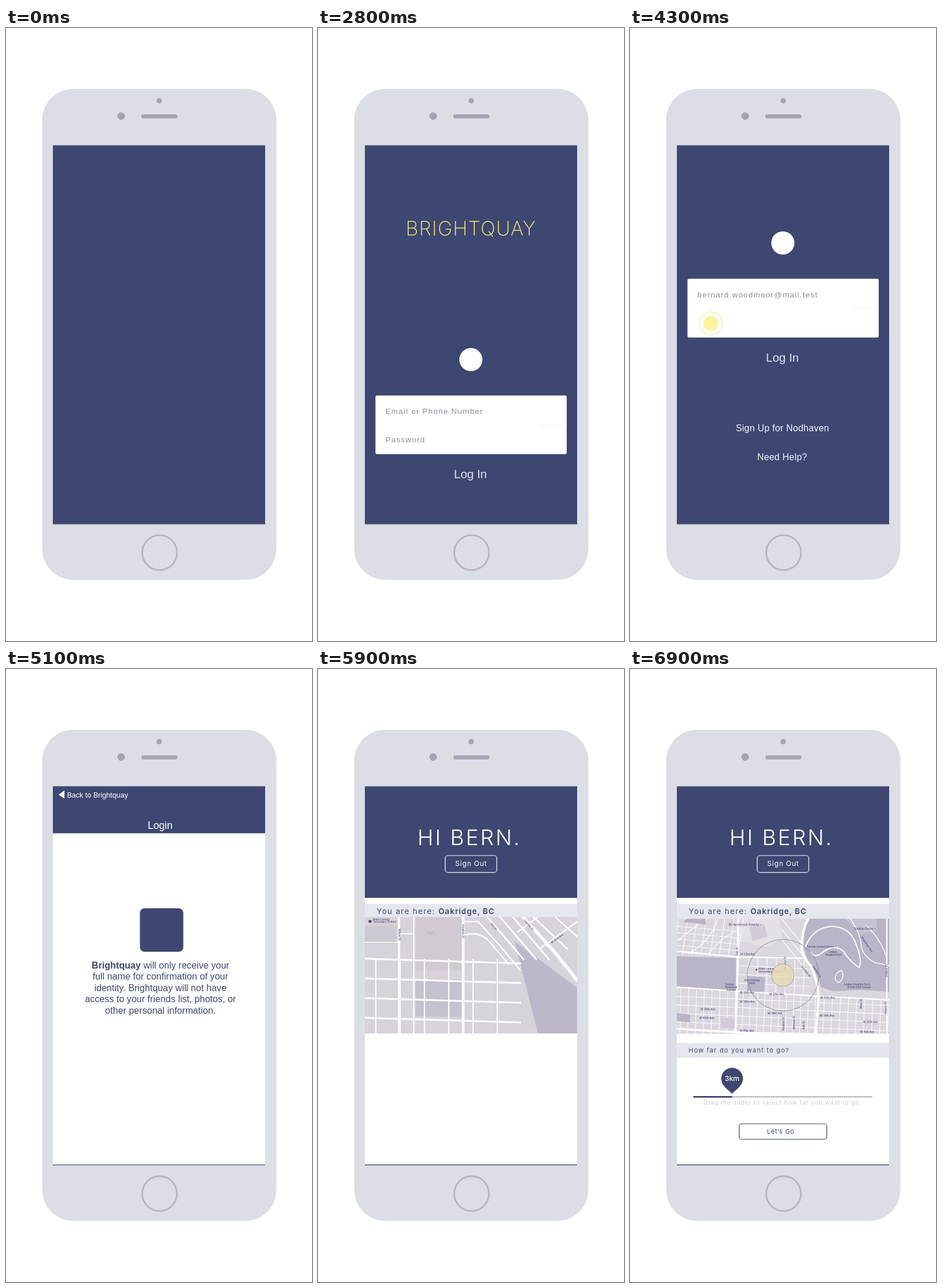
Write an HTML page that moves like this. It is 529 by 1058 pixels and loops after 7000 ms.

```html
<!DOCTYPE html>
<html lang="en">
<head>
<meta charset="utf-8">
<title>Sign-in flow</title>
<style>
  html, body { margin: 0; width: 100%; height: 100%; overflow: hidden; background: #fff; }
  svg { display: block; width: 100vw; height: 100vh; }
  text { white-space: pre; }
  .ui { font-family: Inter, sans-serif; }
  .sys { font-family: "Liberation Sans", sans-serif; }
  .mid { text-anchor: middle; }
  .btn { fill: none; stroke: #fff; stroke-width: 1.2; }
  .road { fill: none; stroke: #fff; stroke-linecap: butt; stroke-linejoin: round; }
  .tag { font: 500 4.6px Inter, sans-serif; fill: #3e4771; }
</style>
</head>
<body>
<svg viewBox="0 0 529 1058" xmlns="http://www.w3.org/2000/svg">
  <defs>
    <clipPath id="screenClip"><rect x="81" y="202.5" width="367" height="653.5"/></clipPath>
    <clipPath id="nearClip"><rect x="81" y="428" width="367" height="201"/></clipPath>
    <clipPath id="farClip"><rect x="81" y="431" width="367" height="198.5"/></clipPath>
  </defs>
  <rect width="529" height="1058" fill="#fff"/>
  <rect x="62.5" y="105" width="405" height="847.5" rx="54" fill="#dcdee6"/>
  <g fill="#a6a4b4">
    <circle cx="265" cy="125.5" r="4.6"/>
    <circle cx="199" cy="152" r="6.5"/>
    <rect x="234" y="149" width="62.5" height="7" rx="3.5"/>
  </g>
  <circle cx="265.5" cy="905.5" r="30" fill="none" stroke="#b9b5c5" stroke-width="3"/>
  <rect x="81" y="202.5" width="367" height="654" fill="#3e4771"/>

  <g clip-path="url(#screenClip)">
    <text id="brand" class="ui mid" x="264.5" font-size="34" font-weight="200" letter-spacing="1.2" fill="#f7ec78">BRIGHTQUAY</text>

    <g id="welcome" class="ui" fill="#fff">
      <g font-size="10" font-weight="500" letter-spacing=".86">
        <text x="148" y="419">Welcome.</text>
        <text x="148" y="433.7">Please introduce yourself to get started.</text>
        <text x="152.5" y="670">Or do you need immediate assistance?</text>
      </g>
      <path d="M148 452.4H380" stroke="#777b8c"/>
      <rect class="btn" x="152.7" y="489.3" width="224" height="29.4" rx="4"/>
      <rect class="btn" x="152.7" y="540.7" width="224" height="29.4" rx="4"/>
      <rect class="btn" x="152.7" y="686.6" width="224" height="29.2" rx="4"/>
      <path class="btn" d="M184.5 489.3v29.4M184.5 540.7v29.4"/>
      <circle cx="168.5" cy="504" r="6.5"/>
      <circle cx="168.5" cy="555" r="6.5"/>
      <g font-size="12" font-weight="300" letter-spacing=".85">
        <text x="210.5" y="508">Sign in with Nodhaven</text>
        <text x="210.5" y="559.4">Sign in with Velmor Plus</text>
        <text x="204" y="705.3" font-size="11.5" font-weight="400" letter-spacing=".8">Let us book for you</text>
      </g>
    </g>

    <g id="social" class="sys">
      <circle cx="264.3" cy="371" r="20" fill="#fff"/>
      <rect x="99.3" y="432.8" width="330.7" height="101.4" rx="3" fill="#fff"/>
      <path d="M384 484h46" stroke="#f1f1f4"/>
      <g font-size="13.5" letter-spacing="1.2" fill="#8f8d9a">
        <text id="mail" x="116.5" y="465"></text>
        <text id="pass" x="116.5" y="513.5">Password</text>
      </g>
      <g class="mid">
        <text x="263.5" y="575.6" font-size="20.5" fill="#e4e4ec">Log In</text>
        <g font-size="15.8" letter-spacing=".3" fill="#f6f6fa">
          <text x="263.7" y="696">Sign Up for Nodhaven</text>
          <text x="263.2" y="746.3">Need Help?</text>
        </g>
      </g>
    </g>

    <g id="tap">
      <circle id="dot" fill="#faf39e"/>
      <circle id="halo" fill="none" stroke="#f3ea94" stroke-width="1.2"/>
    </g>

    <g id="home" class="ui">
      <rect x="81" y="395" width="367" height="460.3" fill="#fff"/>
      <text x="172" y="304" font-size="37" font-weight="300" letter-spacing="3" fill="#fff">HI BERN.</text>
      <rect class="btn" x="220" y="322" width="89" height="29.2" rx="4.5"/>
      <text class="mid" x="264.8" y="340.3" font-size="12" letter-spacing=".8" fill="#fff">Sign Out</text>
      <rect x="81" y="405.5" width="367" height="25.7" fill="#e5e7ee"/>
      <g font-size="13.4" fill="#3e4771">
        <text x="101.3" y="423" letter-spacing="1.35">You are here:</text>
        <text x="208.3" y="423" font-weight="600" letter-spacing="1">Oakridge, BC</text>
      </g>
      <g id="farMap"></g>
      <g id="nearMap"></g>
      <g id="controls">
        <circle cx="264.3" cy="528.5" r="19.5" fill="#e6dcb4" fill-opacity=".82" stroke="#8f8c9c" stroke-width=".8"/>
        <circle id="range" cx="264.7" cy="528.5" fill="none" stroke="#868496" stroke-width=".9"/>
        <rect x="81" y="645.5" width="367" height="25.5" fill="#e5e7ee"/>
        <text x="101.3" y="662.3" font-size="11" letter-spacing="1.2" fill="#3e4771">How far do you want to go?</text>
        <path d="M109.5 738.4H419" stroke="#b9b5c8" stroke-width="2.4"/>
        <path id="done" stroke="#3e4771" stroke-width="2.6"/>
        <text x="126.7" y="752" font-size="10" font-weight="300" letter-spacing="1.05" fill="#bfbec8">Drag the slider to select how far you want to go.</text>
        <circle id="grip" cx="148.8" cy="706.5" r="20" fill="none" stroke="#d8d8cf" stroke-width=".8"/>
        <g id="pin">
          <path d="M0 26C-6 20 -18.8 12 -18.8 0A18.8 18.8 0 1 1 18.8 0C18.8 12 6 20 0 26Z" fill="#3e4771"/>
          <text id="km" class="mid" y="4.2" font-size="12.3" font-weight="500"></text>
        </g>
        <rect x="188.7" y="785" width="151.6" height="26.5" rx="4" fill="#fff" stroke="#3e4771" stroke-width="1.2"/>
        <text class="mid" x="260.6" y="801.6" font-size="11" letter-spacing=".7" fill="#3e4771">Let’s Go</text>
      </g>
    </g>

    <g id="consent" class="sys">
      <rect width="367" height="81" x="81" fill="#3e4771"/>
      <rect x="81" y="81" width="367" height="700" fill="#fff"/>
      <path d="M91 14.3L101 7.3V21.3Z" fill="#fff"/>
      <text x="105.4" y="19" font-size="12.6" fill="#fff">Back to Brightquay</text>
      <text class="mid" x="266.5" y="73.6" font-size="17.6" fill="#fff">Login</text>
      <rect x="231.5" y="210.5" width="75" height="75" rx="8" fill="#3e4771"/>
      <g id="terms" class="mid" font-size="16.1" fill="#3e4771"></g>
    </g>
    <path id="edge" d="M81 855.8H448" stroke="#3e4771" stroke-width="1"/>
  </g>
</svg>
<script>
const $ = id => document.getElementById(id);
const clamp = v => Math.max(0, Math.min(1, v));
const attr = (id, o) => { for (const k in o) $(id).setAttribute(k, o[k]); };
const fade = (id, v) => attr(id, { opacity: clamp(v), display: v > 0 ? 'inline' : 'none' });

const road = (d, w, extra = '') => `<path class="road" d="${d}" stroke-width="${w}" ${extra}/>`;
const area = (d, c) => `<path d="${d}" fill="${c}"/>`;
const tag = (x, y, s, turn = 0) =>
  `<text class="tag" transform="translate(${x} ${y}) rotate(${turn})">${s}</text>`;

// Parallel streets: n copies of one segment, shifted by (sx, sy).
function streets(x, y, dx, dy, sx, sy, n, w) {
  let d = '';
  for (let i = 0; i < n; i++) d += `M${x + sx * i} ${y + sy * i}l${dx} ${dy}`;
  return road(d, w);
}

function drawFarMap() {
  const park = '#b9b5c8', land = '#dcd6de', pale = '#e5dfe6';
  $('farMap').innerHTML = '<g clip-path="url(#farClip)">' + [
    `<rect x="81" y="431" width="367" height="199" fill="${land}"/>`,
    area('M190 431H258L264 466 236 480 190 470Z', pale),
    area('M206 446l26 -6 6 22 -26 8Z', '#d2ccd8'),
    streets(84, 431, -10, 64, 16, 0, 8, 1),
    streets(81, 444, 106, 9, 0, 11, 5, 1),
    road('M81 470Q110 445 134 431M100 492Q140 470 152 431M134 494Q160 460 186 452', 1.2),
    streets(205, 498, -1, 60, 16, .6, 7, 1),
    streets(188, 512, 122, 6, 0, 15, 3, 1),
    streets(88, 551, -2, 80, 13.5, .6, 8, 1),
    streets(196, 559, -3, 72, 12.5, .6, 11, 1),
    streets(336, 566, -3, 66, 14, .4, 9, 1),
    streets(81, 565, 367, 16, 0, 14.6, 4, 1.1),
    streets(262, 431, 36, 44, 0, 18, 3, 1.2),
    area('M92 437L99 431H131L131 441Z', park),
    area('M81 496L183 499V556L81 548Z', park),
    area('M203 530L233 532 232 560 202 558Z', park),
    area('M81 594L104 596V610L81 608Z', park),
    area('M158 602L182 604V621L157 619Z', '#d3c9d8'),
    area('M310 431H448V557L402 554 350 556 330 549Q325 530 312 508Q299 492 300 468Q301 446 310 431Z', park),
    area('M372 431H426V452L400 458Z', '#c8c3d2'),
    road('M303 480Q316 446 350 444Q382 446 392 478Q402 504 396 515Q380 505 368 486Q350 474 332 490Q318 500 312 488', 2),
    road('M381 431Q398 455 400 478Q402 496 424 507L448 512M410 444Q436 470 444 500M366 520Q372 534 361 541Q350 538 358 524Z', 1.4),
    road('M444 431V629', 2.4),
    road('M187 431Q187 520 182 629', 3.6),
    road('M81 487L186 497 298 499', 2.6),
    road('M81 549L186 556 330 565 448 571', 2.4),
    road('M81 621L200 628 320 630', 3.4),
    road('M309 429Q296 452 297 484Q300 500 312 512Q326 540 326 570L321 630', 4.2),
    tag(171, 443, 'BC Northbrook Hospital •'),
    tag(191, 493.5, 'W 33rd Ave'),
    tag(222, 518.5, 'Alder Lennox'), tag(222, 523.5, 'Secondary School'),
    '<circle cx="218.5" cy="519" r="1.6" fill="#3e4771"/>',
    tag(198, 539, 'Elm Hollows'), tag(206, 544, 'Park'),
    tag(165, 546, 'Fennel'), tag(165, 551, 'Botanical'), tag(167, 556, 'Garden'),
    tag(190, 560, 'W 35th Ave'), tag(241, 562.5, 'W 37th Ave'), tag(329, 568.5, 'W 37th Ave'),
    tag(190, 576, 'W 38th Ave'), tag(122, 589, 'W 39th Ave'), tag(238, 596, 'W 39th Ave'),
    tag(328, 600, 'W 39th Ave'), tag(120, 604, 'W 40th Ave'), tag(403, 611, 'W 40th Ave'),
    tag(190, 626, 'W 41st Ave'), tag(398, 628, 'W 41st Ave'),
    tag(186.5, 495, 'Oak St', -90), tag(269.5, 520, 'Heather St', -90),
    tag(267, 624, 'Heather St', -90), tag(284.5, 622, 'Manson St', -90), tag(301.5, 622, 'Ash St', -90),
    tag(296, 514, 'Cambie St', 52), tag(316, 514, 'Cambie St', 58),
    tag(401, 586, 'Main St', -90), tag(445, 532, 'Ontario St', -90), tag(444, 596, 'Ontario St', -90),
    tag(306, 481, 'Tarrow Conservatory •'),
    tag(343, 489.5, 'Linden'), tag(338, 494.5, 'Heights Park'),
    tag(387, 450, 'Stadium Centre •'), tag(399, 463, 'Midlothian Ave', 55),
    tag(370, 546, 'Linden Heights Pitch'), tag(376, 551, '&amp; Putt Golf Course')
  ].join('') + '</g>';
}

function drawNearMap() {
  $('nearMap').innerHTML = '<g clip-path="url(#nearClip)">' + [
    '<rect x="81" y="428" width="367" height="202" fill="#d8d2db"/>',
    area('M81 443H135V475H81Z', '#cfc9d3'),
    area('M169 428H248V520H169Z', '#d1cad3'),
    area('M188 452h13v7h-13Z', '#c7c1cb'),
    area('M169 536H248V600H169Z', '#c6c0cf'),
    area('M340 470L448 550V629H380Z', '#bcb7c9'),
    road('M140 428V629', 4), road('M165.5 428V629', 2.6), road('M138 457H167', 2.2),
    road('M81 472H137', 1.6), road('M251 428V629', 4.6),
    road('M253 459Q280 452 296 470L330 510', 2.6),
    road('M253 436H277L313 476 350 520', 2.4),
    streets(286, 420, 70, 82, 22, 0, 3, 3),
    road('M353 426L412 492 450 540', 5.4), road('M368 424L432 484', 3),
    road('M345 454L380 428M385 482L448 436M410 428L448 462', 2.6),
    streets(81, 500, 270, 8, 0, 34, 4, 3),
    streets(100, 500, 0, 130, 42, 0, 6, 2.2),
    tag(95, 433.5, 'Alder Lennox'), tag(95, 438.3, 'Secondary School'),
    '<circle cx="90" cy="435.5" r="2.6" fill="#3e4771"/>',
    tag(138.8, 448, 'Willow St', 90), tag(249.2, 441, 'Heather St', 90),
    tag(298, 440, 'Ash St', 50), tag(356, 434, 'Cambie St', 50), tag(404, 474, 'W 35th Ave', -36)
  ].join('') + '</g>';
}

const terms = ['<tspan font-weight="700">Brightquay</tspan> will only receive your',
  'full name for confirmation of your', 'identity. Brightquay will not have',
  'access to your friends list, photos, or', 'other personal information.'];
$('terms').innerHTML = terms.map((s, i) => `<text x="267" y="${314 + 19.5 * i}">${s}</text>`).join('');
drawFarMap();
drawNearMap();

const MAIL = 'bernard.woodmoor@mail.test';
const zoom = s => `translate(264.5 528.5) scale(${s}) translate(-264.5 -528.5)`;

function drawTap(t) {
  const second = t >= 4200, dt = t - (second ? 4200 : 2100);
  const k = clamp((dt + 100) / 200);
  const x = second ? 139.8 : 268.5, y = second ? 509.7 : 503;
  fade('tap', dt < 0 ? 0 : 1 - (dt - 100) / 200);
  attr('dot', { cx: x, cy: y, r: 13 * k });
  attr('halo', { cx: x, cy: y, r: 19.5 * k });
}

function drawHome(t) {
  const p = clamp((t - 5900) / 800), e = 1 - (1 - p) ** 3.3;
  fade('home', t >= 5200 ? 1 : 0);
  fade('edge', t >= 4400 ? 1 : 0);
  attr('farMap', { transform: zoom(.07 + .93 * e) });
  fade('farMap', p * 1.6);
  attr('nearMap', { transform: zoom(1 - .66 * e) });
  fade('nearMap', 1 - 2 * p);
  fade('controls', (t - 5900) / 200);
  const drag = clamp((t - 6700) / 200), x = 150.3 + 26.2 * drag;
  attr('pin', { transform: `translate(${x} 707)` });
  attr('done', { d: `M109.5 738.4H${x}` });
  attr('range', { r: 19.5 + 42.3 * drag });
  fade('grip', t < 6800 ? 1 : 0);
  $('km').textContent = drag < 1 ? '2km' : '3km';
  attr('km', { fill: drag > 0 ? '#fff' : '#f3ebb4' });
}

function draw(t) {
  fade('brand', t < 2800 ? (t - 700) / 600 : 1 - (t - 2800) / 300);
  attr('brand', { y: t < 1800 ? 541.5 : 358 });
  fade('welcome', t >= 1800 && t < 2700 ? 1 : 0);

  const rise = 310 * (1 - clamp((t - 2700) / 700)) ** 2.8;
  fade('social', t >= 2700 && t < 5200 ? 1 : 0);
  attr('social', { transform: `translate(0 ${rise})` });
  const typed = Math.ceil(MAIL.length * clamp((t - 3500) / 700));
  $('mail').textContent = typed ? MAIL.slice(0, typed) : 'Email or Phone Number';
  fade('pass', t < 4200 ? 1 : 0);
  drawTap(t);

  drawHome(t);
  const u = t < 5100 ? 1 - clamp((t - 4300) / 800) : clamp((t - 5100) / 800);
  fade('consent', t >= 4400 && t < 5900 ? 1 : 0);
  attr('consent', { transform: `translate(0 ${202.5 + 653.5 * u ** 3.03})` });
}

// The motion runs at ten pictures a second.
function tick(now) {
  draw(Math.floor((now % 7000) / 100) * 100);
  requestAnimationFrame(tick);
}
draw(0);
requestAnimationFrame(tick);
</script>
</body>
</html>
```
